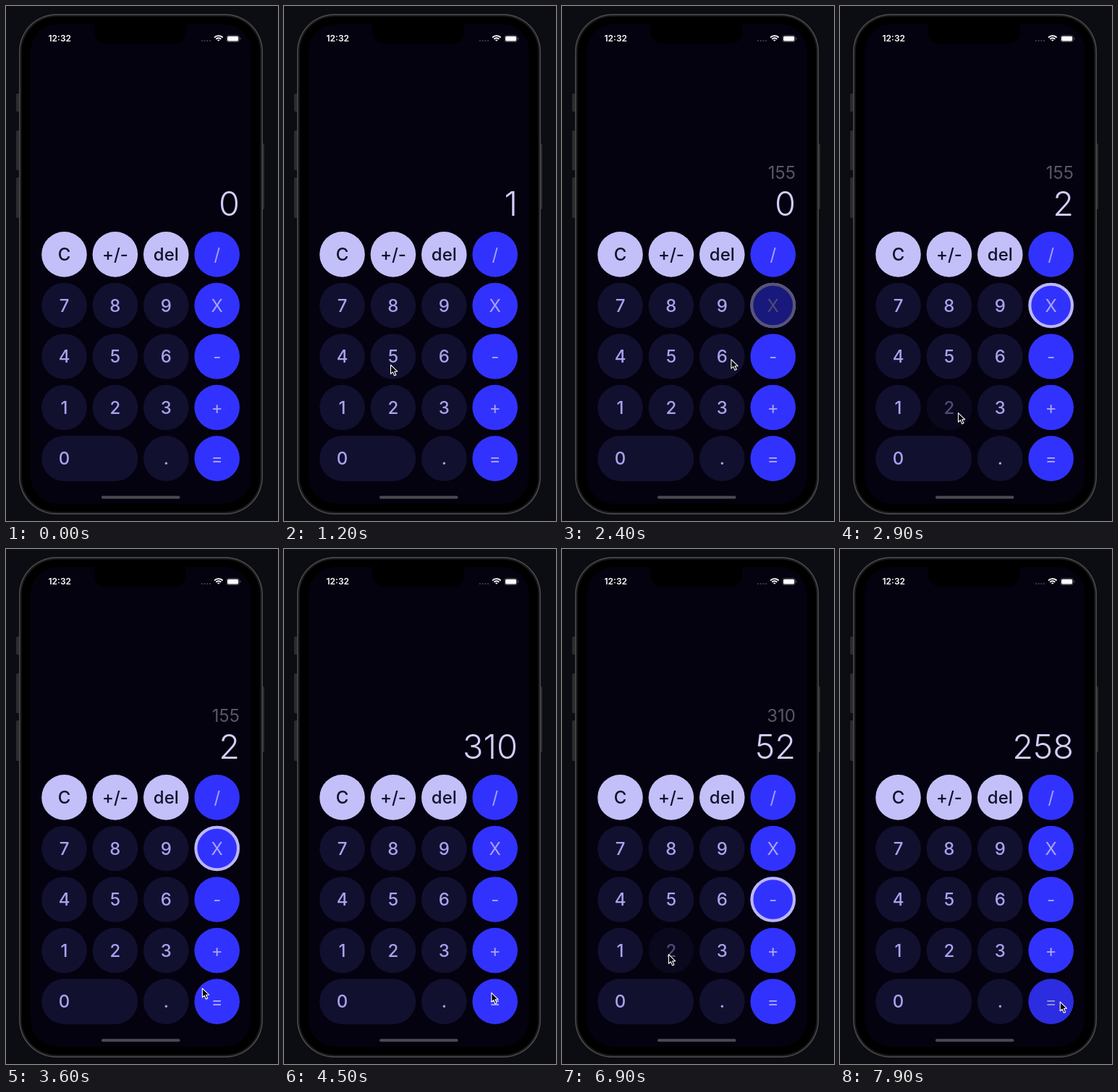
Write an HTML page with a canvas that moves like this. It is 376 by 712 pixels and loops after 8 s.

```html
<!DOCTYPE html>
<html lang="en">
<head>
<meta charset="utf-8">
<title>Calculator</title>
<style>
html, body { margin: 0; width: 100%; height: 100%; overflow: hidden; background: #0b0d12; }
canvas { display: block; width: 376px; height: 712px; }
</style>
</head>
<body>
<canvas id="stage"></canvas>
<script>
const W = 376, H = 712, LOOP = 8000, STEP = 100;
const canvas = document.getElementById('stage');
const ctx = canvas.getContext('2d');
const ratio = window.devicePixelRatio || 1;
canvas.width = W * ratio;
canvas.height = H * ratio;

const FONT = 'Inter, "Liberation Sans", sans-serif';
const SCREEN = '#04020f';
const STYLES = {
  light: { fill: '#c3c0f9', ink: '#14112f', weight: 500 },
  dark: { fill: '#12102f', ink: '#a9a3ee', weight: 500 },
  op: { fill: '#3232ff', ink: '#a9a4f1', weight: 400 }
};

const RADIUS = 31.3, PITCH_X = 70.4, PITCH_Y = 70.55;
const ROWS = ['C +/- del /', '7 8 9 X', '4 5 6 -', '1 2 3 +', '0  . ='];
const KEYS = ROWS.flatMap((line, row) => line.split(' ').map((label, col) => ({
  label,
  x: 80.5 + col * PITCH_X,
  y: 343.4 + row * PITCH_Y,
  wide: label === '0',
  style: STYLES[col === 3 ? 'op' : row === 0 ? 'light' : 'dark']
}))).filter(key => key.label);

// Every visit: glide to the key, wait, then tap it once or more.
const TRAVEL = 200, PRESS = 150, FADE = 250, TAP = 300;
const visit = (label, arrive, dx, dy, count = 1) => {
  const key = KEYS.find(k => k.label === label);
  return { label, arrive, count, x: key.x + dx, y: key.y + dy };
};
const VISITS = [
  visit('0', 0, 20, -10, 0),
  visit('1', 500, 6, 4),
  visit('5', 1200, -4, 11, 2),
  visit('X', 2000, 12, 0),
  visit('2', 2500, 12, 7),
  visit('=', 3650, -5.5, -12.5),
  visit('-', 4700, 4, 31),
  visit('5', 5550, 19.5, 21),
  visit('2', 6500, -4, 5),
  visit('=', 7420, 12, 0)
];
const TAPS = VISITS.flatMap(({ label, arrive, count }) =>
  Array.from({ length: count }, (_, i) => ({ label, up: arrive + (i + 1) * TAP })));

const OPERATIONS = {
  '/': (a, b) => a / b, 'X': (a, b) => a * b, '-': (a, b) => a - b, '+': (a, b) => a + b
};
const clamp = u => Math.max(0, Math.min(1, u));
const mix = (a, b, u) => a + (b - a) * u;
const ease = u => u < 0.5 ? 2 * u * u : 1 - 2 * (1 - u) ** 2;

function press(state, label) {
  const { value, previous, active } = state;
  if (label in OPERATIONS) return { value: '0', previous: value, active: label };
  if (label === '=') return { value: String(OPERATIONS[active](+previous, +value)) };
  return { ...state, value: value === '0' ? label : value + label };
}

function opacityOf(label, t) {
  const tap = TAPS.findLast(p => p.label === label && t >= p.up - PRESS);
  if (!tap) return 1;
  return t < tap.up
    ? mix(1, 0.2, ease((t - tap.up + PRESS) / PRESS))
    : mix(0.2, 1, ease(clamp((t - tap.up) / FADE)));
}

function box(x, y, w, h, r, fill) {
  ctx.beginPath();
  ctx.roundRect(x, y, w, h, r);
  ctx.fillStyle = fill;
  ctx.fill();
}

function write(text, x, y, size, color, align = 'center', weight = 400) {
  ctx.font = `${weight} ${size}px ${FONT}`;
  ctx.textAlign = align;
  ctx.fillStyle = color;
  ctx.fillText(text, x, y);
}

function drawPhone() {
  ctx.fillStyle = '#0b0d12';
  ctx.fillRect(0, 0, W, H);
  box(14, 121, 5, 25, 1.5, '#2b2c2e');
  box(14, 172, 5, 55, 1.5, '#2b2c2e');
  box(14, 237, 5, 56, 1.5, '#2b2c2e');
  box(353, 190, 4, 91, 1.5, '#2b2c2e');
  box(18, 11, 337, 692, 52, '#4c4c4e');
  box(19.4, 12.4, 334.2, 689.2, 50.6, '#1b1b1d');
  box(21.5, 14.5, 330, 685, 48.5, '#000');
  box(34, 25, 304.5, 663, 37, SCREEN);
  box(122, 20, 127, 32, [0, 0, 16, 16], '#000');
  box(132, 677.3, 108.5, 4, 2, '#4b494f');
}

function drawStatus() {
  write('12:32', 58.5, 49.3, 12, '#fff', 'left', 600);
  for (let i = 0; i < 4; i++) box(269.8 + i * 3.7, 46.9, 2.3, 2.3, 1.15, '#403e49');

  ctx.strokeStyle = '#fff';
  ctx.lineWidth = 1.9;
  for (let r = 1.5; r < 9; r += 3.2) {
    ctx.beginPath();
    ctx.arc(293.8, 49, r, -Math.PI * 0.76, -Math.PI * 0.24);
    ctx.stroke();
  }
  box(304.6, 40.3, 18, 9.6, 3, '#4a4851');
  box(305.4, 41.1, 16.4, 8, 2.3, SCREEN);
  box(306, 41.7, 15.2, 6.8, 1.7, '#fff');
  box(323.2, 43.6, 1.2, 3, 0.6, '#4a4851');
}

function drawKey({ label, x, y, wide, style }, active, opacity) {
  const width = 2 * RADIUS + (wide ? PITCH_X : 0);
  const shape = fill => box(x - RADIUS, y - RADIUS, width, 2 * RADIUS, RADIUS, fill);
  shape(style.fill);
  if (active) {
    ctx.beginPath();
    ctx.arc(x, y, RADIUS - 2, 0, 2 * Math.PI);
    ctx.strokeStyle = '#bcb7f1';
    ctx.lineWidth = 4;
    ctx.stroke();
  }
  write(label, x, y + 8.6, 24, style.ink, 'center', style.weight);
  ctx.globalAlpha = 1 - opacity;
  shape(SCREEN);
  ctx.globalAlpha = 1;
}

function drawPointer(t) {
  if (t < STEP) return;
  const i = VISITS.findLastIndex(v => t >= v.arrive - TRAVEL);
  const to = VISITS[i], from = VISITS[i - 1] || to;
  const u = ease(clamp((t - to.arrive + TRAVEL) / TRAVEL));
  ctx.save();
  ctx.translate(mix(from.x, to.x, u), mix(from.y, to.y, u));
  const arrow = new Path2D('M.6 .6V13.2L3.5 10.6L5.7 15.6L8 14.6L5.8 9.8L9.8 9.6Z');
  ctx.fillStyle = '#050505';
  ctx.fill(arrow);
  ctx.strokeStyle = '#fff';
  ctx.lineWidth = 1.1;
  ctx.lineJoin = 'round';
  ctx.stroke(arrow);
  ctx.restore();
}

function render(now) {
  const t = Math.floor((now % LOOP) / STEP) * STEP;
  const state = TAPS.filter(tap => t >= tap.up)
    .reduce((s, tap) => press(s, tap.label), { value: '0' });
  ctx.setTransform(ratio, 0, 0, ratio, 0, 0);
  drawPhone();
  drawStatus();
  if (state.previous) write(state.previous, 323, 238.5, 24, '#5a5866', 'right');
  write(state.value, 323, 289.5, 47, '#d3cefb', 'right', 300);
  for (const key of KEYS) drawKey(key, key.label === state.active, opacityOf(key.label, t));
  drawPointer(t);
}

const start = performance.now();
function tick() {
  render(performance.now() - start);
  requestAnimationFrame(tick);
}
tick();
</script>
</body>
</html>
```
